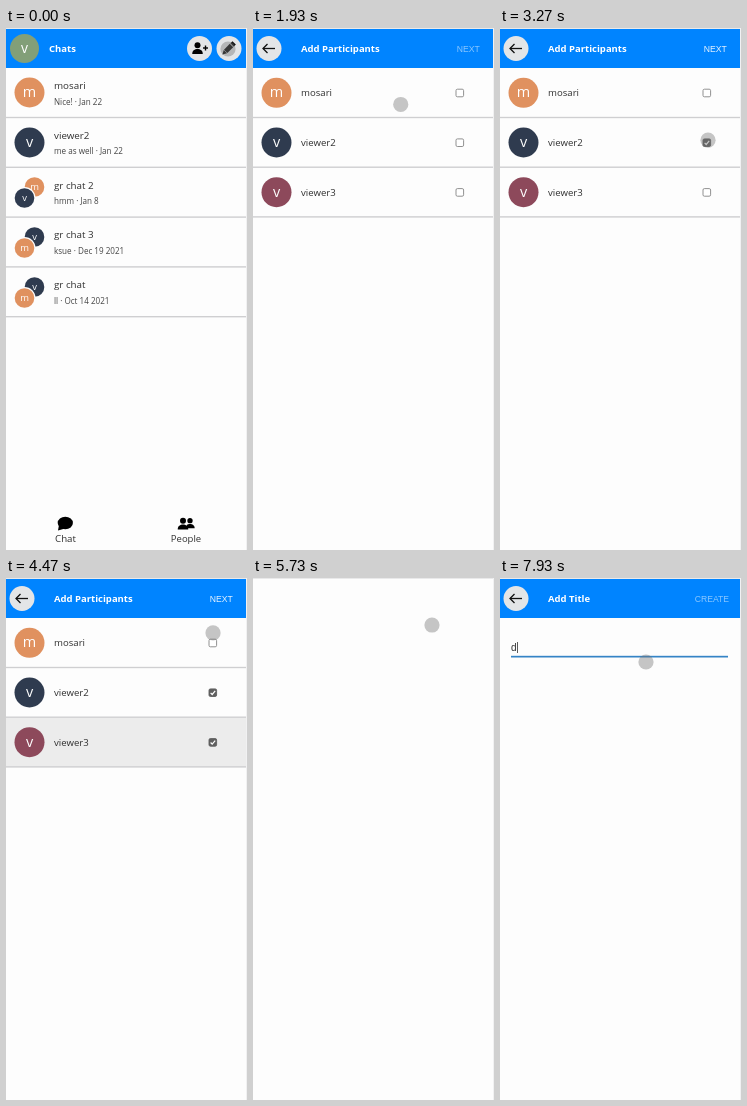
These frames come from a looping animation (241x522 px, 8000 ms). An HTML page with a canvas:

```html
<!DOCTYPE html>
<html lang="en">
<head>
<meta charset="utf-8">
<title>Group chat flow</title>
<style>
html, body { margin: 0; width: 100%; height: 100%; overflow: hidden; background: #fdfdfd; }
canvas { display: block; width: 241px; height: 522px; }
</style>
</head>
<body>
<canvas id="stage"></canvas>
<script>
const W = 241, H = 522, LOOP = 8000;
const canvas = document.getElementById('stage');
const ctx = canvas.getContext('2d');
const dpr = window.devicePixelRatio || 1;
canvas.width = Math.round(W * dpr);
canvas.height = Math.round(H * dpr);

const SANS = '"Open Sans", "Noto Sans", sans-serif';
const ARIAL = '"Liberation Sans", Arial, sans-serif';
const BLUE = '#0084ff', ORANGE = '#e0915f', NAVY = '#2f3b4f', WINE = '#8d495b';
const PAPER = '#fdfdfd', INK = '#303030', BUTTON = '#e3e5e7';
const PEOPLE = [['mosari', ORANGE], ['viewer2', NAVY], ['viewer3', WINE]];

// Pointer path: time, x, y
const PATH = [
  [0, 222, 21], [470, 222, 21], [800, 178, 47], [1070, 157, 57],
  [1400, 148, 64], [1800, 146, 66], [2100, 150, 90], [2400, 147, 102],
  [2600, 133, 110], [2670, 208, 28], [2950, 208, 28], [3200, 208, 112],
  [3530, 208, 113], [3730, 208, 172], [4270, 208, 172], [4470, 207, 55],
  [4730, 212, 24], [5200, 212, 22], [5600, 185, 42], [5730, 179, 47],
  [5870, 176, 49], [6270, 144, 68], [6830, 144, 68], [7070, 146, 84], [LOOP, 146, 84]
];

function disc(x, y, r, color) {
  ctx.fillStyle = color;
  ctx.beginPath();
  ctx.arc(x, y, r, 0, Math.PI * 2);
  ctx.fill();
}

function text(str, x, y, size, color = INK, weight = 400, family = SANS, align = 'left') {
  ctx.font = `${weight} ${size}px ${family}`;
  ctx.textAlign = align;
  ctx.fillStyle = color;
  ctx.fillText(str, x, y);
}

function stroke(points, color, width) {
  ctx.strokeStyle = color;
  ctx.lineWidth = width;
  ctx.beginPath();
  points.forEach(([x, y], i) => i ? ctx.lineTo(x, y) : ctx.moveTo(x, y));
  ctx.stroke();
}

function rule(y) {
  ctx.fillStyle = '#cfcfd1';
  ctx.fillRect(0, y - 0.7, 240, 1.4);
}

function avatar(letter, x, y, r, color) {
  disc(x, y, r, color);
  text(letter, x, y + r * 0.29, r * 0.96, '#fff', 400, SANS, 'center');
}

function pair(y, back, front) {
  avatar(back[0][0], 28.5, y - 5.5, 9.8, back[1]);
  disc(18.5, y + 5.5, 11, PAPER);
  avatar(front[0][0], 18.5, y + 5.5, 9.8, front[1]);
}

function person(x, y, s, color = '#000') {
  disc(x, y - 2.6 * s, 2.4 * s, color);
  ctx.beginPath();
  ctx.moveTo(x - 4.2 * s, y + 4.3 * s);
  ctx.bezierCurveTo(x - 4.4 * s, y - 0.8 * s, x + 4.4 * s, y - 0.8 * s, x + 4.2 * s, y + 4.3 * s);
  ctx.fill();
}

function header(title, x = 48) {
  ctx.fillStyle = BLUE;
  ctx.fillRect(0, 1, 240, 39);
  text(title, x, 24, 9.5, '#fff', 700);
}

function action(label, x, on) {
  text(label, x, 23.5, 8.65, on ? '#e8f4ff' : '#8ac7ff', 400, ARIAL);
}

function backButton() {
  disc(16, 20.5, 12.5, BUTTON);
  stroke([[22, 20.5], [10, 20.5]], '#111', 1.3);
  stroke([[14.5, 16], [10, 20.5], [14.5, 25]], '#111', 1.3);
}

function pencil(x, y) {
  ctx.save();
  ctx.translate(x, y);
  ctx.rotate(Math.PI / 4);
  ctx.fillStyle = '#111';
  ctx.fillRect(-2.4, -8, 4.8, 3);
  ctx.fillRect(-2.4, -4.2, 4.8, 8.2);
  ctx.beginPath();
  ctx.moveTo(-2.4, 4.4);
  ctx.lineTo(2.4, 4.4);
  ctx.lineTo(0, 8.6);
  ctx.fill();
  ctx.restore();
}

function chatRow(i, name, note) {
  const y = 40 + i * 49.8;
  text(name, 48, y + 21, 9.8);
  text(note, 48, y + 36.5, 8.1, '#444');
  rule(y + 49.5);
}

function chats() {
  header('Chats', 43);
  avatar('v', 18.5, 20.5, 14.5, '#829f78');
  disc(193.5, 20.5, 12.5, BUTTON);
  person(191.5, 20.5, 1.25);
  stroke([[197, 20], [202, 20]], '#000', 1.4);
  stroke([[199.5, 17.5], [199.5, 22.5]], '#000', 1.4);
  disc(223, 20.5, 12.5, BUTTON);
  pencil(222.5, 20.5);

  const [m, v] = PEOPLE;
  avatar('m', 23.5, 64.5, 15, ORANGE);
  avatar('v', 23.5, 114.5, 15, NAVY);
  pair(164.5, m, v);
  pair(214.5, v, m);
  pair(264.5, v, m);
  chatRow(0, m[0], 'Nice! · Jan 22');
  chatRow(1, v[0], 'me as well · Jan 22');
  chatRow(2, 'gr chat 2', 'hmm · Jan 8');
  chatRow(3, 'gr chat 3', 'ksue · Dec 19 2021');
  chatRow(4, 'gr chat', 'll · Oct 14 2021');

  ctx.fillStyle = '#000';
  ctx.beginPath();
  ctx.ellipse(59.3, 495, 7.6, 6.2, 0, 0, Math.PI * 2);
  ctx.fill();
  ctx.beginPath();
  ctx.moveTo(53, 497);
  ctx.lineTo(52, 502.5);
  ctx.lineTo(59, 500.5);
  ctx.fill();
  person(184, 495.5, 1.1);
  disc(177, 495.5, 4.2, PAPER);
  person(177, 496, 1.25);
  text('Chat', 59.5, 514, 9.7, INK, 400, SANS, 'center');
  text('People', 180, 514, 9.5, INK, 400, SANS, 'center');
}

function personRow([name, color], mid) {
  avatar(name[0], 23.5, mid, 15, color);
  text(name, 48, mid + 3.6, 9.6);
  rule(mid + 24.7);
}

function newMessage() {
  header('New message');
  disc(16, 20.5, 12.5, BUTTON);
  stroke([[10.8, 15.3], [21.2, 25.7]], '#111', 2);
  stroke([[21.2, 15.3], [10.8, 25.7]], '#111', 2);
  disc(23.5, 65, 14.8, '#e6e6e6');
  person(17.5, 64.5, 0.85);
  person(29.5, 64.5, 0.85);
  disc(23.5, 63.5, 3.6, '#e6e6e6');
  person(23.5, 66, 1.05);
  text('Create a New Group', 48, 68.2, 9.6);
  rule(89.5);
  text('Suggested:', 9, 110.5, 9.6);
  rule(119.5);
  PEOPLE.forEach((p, i) => personRow(p, 144.5 + i * 49.7));
}

function checkbox(mid, on) {
  ctx.beginPath();
  ctx.roundRect(203, mid - 3.6, 7.6, 7.6, 1.4);
  ctx.fillStyle = on ? '#5f5f5f' : '#fff';
  ctx.fill();
  ctx.strokeStyle = on ? '#5f5f5f' : '#858585';
  ctx.lineWidth = 0.9;
  ctx.stroke();
  if (on) stroke([[204.6, mid + 0.3], [206.2, mid + 2], [209.2, mid - 1.6]], '#fff', 1.2);
}

function participants(t) {
  const checked = [false, t >= 3265, t >= 3700];
  header('Add Participants');
  backButton();
  action('NEXT', 203.7, checked[1]);
  if (checked[2] && t < 4930) {
    ctx.fillStyle = '#ececec';
    ctx.fillRect(0, 140, 240, 49);
  }
  PEOPLE.forEach((p, i) => {
    const mid = 64.8 + i * 49.7;
    personRow(p, mid);
    checkbox(mid, checked[i]);
  });
}

function groupTitle(t) {
  const focus = 6530, typed = t >= 7730;
  header('Add Title');
  backButton();
  action('CREATE', 194.7, false);
  if (typed) text('d', 11, 73, 10, INK, 400, ARIAL);
  else text('Group Name (Required)', 11, 73, 10, '#a9a9ab', 400, ARIAL);
  ctx.fillStyle = '#929292';
  ctx.fillRect(11, 78, 217, 0.8);
  if (t < focus) return;

  const grow = 1 - Math.pow(1 - Math.min(1, (t - focus) / 190), 3);
  ctx.fillStyle = '#3584c6';
  ctx.fillRect(119.5 - 108.5 * grow, 77.8, 217 * grow, 1.7);
  if (typed || (t - focus) % 1000 < 500) {
    ctx.fillStyle = '#333';
    ctx.fillRect(typed ? 17 : 11, 64, 0.8, 11);
  }
}

function pointer(t) {
  let i = 1;
  while (i < PATH.length - 1 && PATH[i][0] <= t) i++;
  const [t0, x0, y0] = PATH[i - 1], [t1, x1, y1] = PATH[i];
  const k = (t - t0) / (t1 - t0);
  disc(x0 + (x1 - x0) * k, y0 + (y1 - y0) * k, 7.6, 'rgba(112,112,112,0.4)');
}

function clear() {
  ctx.fillStyle = PAPER;
  ctx.fillRect(0, 0, W, H);
}

function draw(t) {
  ctx.setTransform(dpr, 0, 0, dpr, 0, 0);
  clear();
  if (t < 530) chats();
  else if (t < 1800) newMessage();
  else if (t < 5270) participants(t);
  else if (t >= 5870) groupTitle(t);

  // brief half blend while the page swaps
  if (t >= 1730 && t < 1800) {
    ctx.globalAlpha = 0.5;
    clear();
    participants(t);
    ctx.globalAlpha = 1;
  }
  ctx.fillStyle = '#e9e9ea';
  ctx.fillRect(0, 0, W, 1);
  ctx.fillStyle = '#f1f1f2';
  ctx.fillRect(240, 0, 1, H);
  pointer(t);
}

const start = performance.now();
function tick() {
  draw((performance.now() - start) % LOOP);
  requestAnimationFrame(tick);
}
tick();
</script>
</body>
</html>
```
